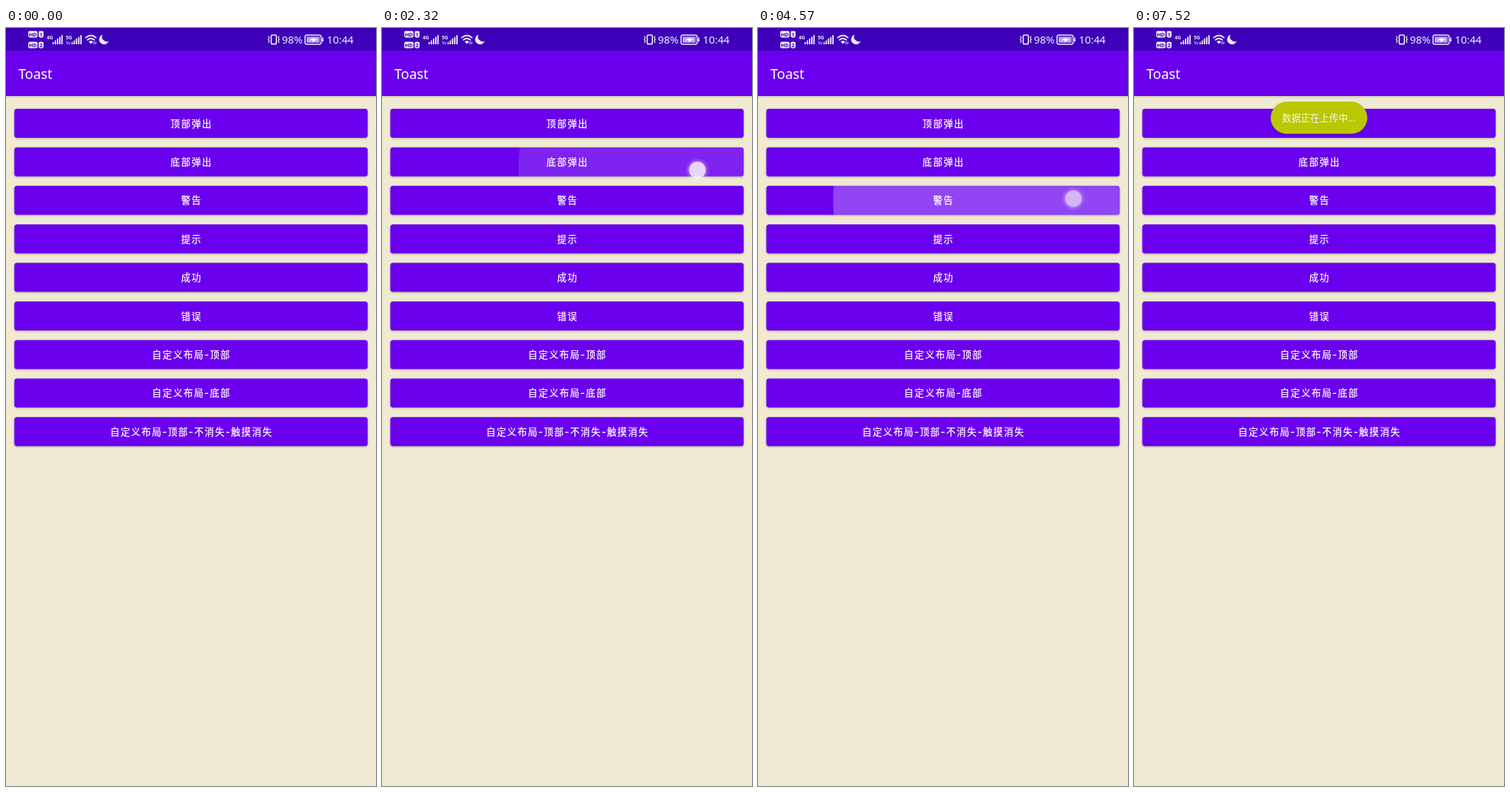
An HTML page that plays this animation: 523x1070 px, repeating every 8000 ms.

```html
<!DOCTYPE html>
<html lang="zh">
<head>
<meta charset="utf-8">
<title>Toast</title>
<style>
  html, body { margin: 0; width: 100%; height: 100%; overflow: hidden; background: #efead1; }
  svg { display: block; width: 100vw; height: 100vh; }
  .label, .note { font: 500 13.3px Inter, "Noto Sans CJK SC", sans-serif; fill: #fff; text-anchor: middle; }
  .label { letter-spacing: 1.5px; stroke: #fff; stroke-width: .25px; }
  .note { font-weight: 400; fill: #f6f8ee; }
  .title { font: 500 19.3px "Noto Sans", sans-serif; fill: #fff; }
  .clock { font: 400 14.8px "Noto Sans", sans-serif; }
  .tiny { font: 700 7px Roboto, sans-serif; }
  .badge { font: 700 8px Roboto, sans-serif; fill: #3e00b8; text-anchor: middle; }
</style>
</head>
<body>
<svg id="stage" viewBox="0 0 523 1070" preserveAspectRatio="none">
  <defs>
    <clipPath id="content"><rect y="96" width="523" height="974"/></clipPath>
    <linearGradient id="barShade" x2="0" y2="1">
      <stop stop-color="#000" stop-opacity=".12"/>
      <stop offset="1" stop-color="#000" stop-opacity="0"/>
    </linearGradient>
    <radialGradient id="halo">
      <stop offset=".66" stop-color="#fff" stop-opacity=".32"/>
      <stop offset="1" stop-color="#fff" stop-opacity="0"/>
    </radialGradient>
    <filter id="shadow" x="-10%" y="-20%" width="120%" height="150%">
      <feDropShadow dx="0" dy="1.2" stdDeviation="1" flood-color="#332" flood-opacity=".32"/>
    </filter>
  </defs>

  <rect width="523" height="1070" fill="#efead1"/>
  <rect y="96" width="523" height="4" fill="url(#barShade)"/>
  <g id="buttons"></g>
  <g id="toasts" clip-path="url(#content)"></g>
  <rect y="31" width="523" height="65" fill="#6a00ee"/>
  <rect width="523" height="32" fill="#3e00b8"/>
  <text class="title" x="17.5" y="72">Toast</text>

  <g id="status" fill="#f3effb">
    <text class="tiny" x="57.5" y="15.5" textLength="auto">4G</text>
    <text class="tiny" x="84.5" y="15.5">5G</text>
    <path d="M86.5 23v-4m-1.3 1.3 1.3-1.5M89 19v4m1.3-1.3-1.3 1.5" fill="none" stroke="#f3effb" stroke-width=".8"/>
    <g fill="none" stroke="#f3effb" stroke-width="1.8" stroke-linecap="round">
      <path d="M112.8 13.6Q120 7.4 127.2 13.6M115.2 16.8Q120 12.8 124.8 16.8"/>
    </g>
    <path d="M117 19.2q3-2.4 6 0l-3 3.6z"/>
    <path d="M124.3 23v-4m2.5 0v4" stroke="#f3effb" stroke-width="1"/>
    <path d="M136.5 9.4A7 7 0 1 0 145.3 18.4A6.6 6.6 0 0 1 136.5 9.4Z"/>
    <g fill="none" stroke="#f3effb" stroke-width="1.6">
      <rect x="374.8" y="10" width="7.4" height="12.6" rx="1.2"/>
      <path d="M370.8 11.5 372.2 13.5 370.8 16 372.2 18.5 370.8 21M386.2 11.5 384.8 13.5 386.2 16 384.8 18.5 386.2 21" stroke-width="1.3"/>
      <rect x="422.6" y="10" width="23" height="13" rx="3" stroke-width="1.5"/>
    </g>
    <rect x="424.8" y="12.2" width="18.6" height="8.6" rx="1.4" fill="#b9a3e4"/>
    <rect x="446.8" y="13.6" width="1.8" height="6" rx=".8"/>
    <path d="M428.5 17.2 436 13.2 435.4 15.8 441 15.6 433 20 433.8 17.3Z" fill="#fff"/>
    <text class="clock" x="390" y="22.3">98%</text>
    <text class="clock" x="453.5" y="22.3">10:44</text>
  </g>
  <g id="dot">
    <circle r="17" fill="url(#halo)"/>
    <circle r="11.8" fill="#fff" fill-opacity=".72"/>
  </g>
</svg>
<script>
const LOOP = 8000;
const $ = id => document.getElementById(id);
const clamp = v => Math.min(1, Math.max(0, v));

function make(tag, attrs, parent, text) {
  const el = document.createElementNS("http://www.w3.org/2000/svg", tag);
  for (const key in attrs) el.setAttribute(key, attrs[key]);
  if (text) el.textContent = text;
  parent.appendChild(el);
  return el;
}

// status bar: line badges and signal bars
["1", "2"].forEach((num, i) => {
  const y = 4.2 + i * 15.2;
  for (const [x, w, s] of [[31.5, 13, "HD"], [46.2, 6.8, num]]) {
    make("rect", { x, y, width: w, height: 9.2, rx: 1.8 }, $("status"));
    make("text", { class: "badge", x: x + w / 2, y: y + 7.5 }, $("status"), s);
  }
});
for (const x of [65.8, 92.6])
  for (let i = 0; i < 5; i++) {
    const h = 3 + i * 2.5;
    make("rect", { x: x + i * 3.1, y: 23 - h, width: 1.9, height: h, rx: .6 }, $("status"));
  }

const names = ["顶部弹出", "底部弹出", "警告", "提示", "成功", "错误",
  "自定义布局-顶部", "自定义布局-底部", "自定义布局-顶部-不消失-触摸消失"];
const buttonTop = i => 114 + i * 54.4;

const ripples = names.map((name, i) => {
  const box = { x: 11.7, y: buttonTop(i), width: 499.6, height: 41, rx: 4 };
  make("rect", { ...box, fill: "#6a00ee", filter: "url(#shadow)" }, $("buttons"));
  const clip = make("clipPath", { id: "clip" + i }, $("buttons"));
  make("rect", box, clip);
  const layer = make("g", { "clip-path": `url(#clip${i})` }, $("buttons"));
  const ripple = make("circle", { fill: "#fff", "fill-opacity": 0 }, layer);
  make("text", { class: "label", x: 262.2, y: box.y + 25.6 }, $("buttons"), name);
  return ripple;
});

// each press opens one toast; `from` is the hidden offset
const presses = [
  { at: 496, y: 138, leave: 1845, top: 104, from: -55, w: 113, rx: 10, fill: "#2a6800", text: "我是在顶部的" },
  { at: 2254, y: 200.5, leave: 4115, top: 1005, from: 66, w: 113.5, rx: 22.7, fill: "#2a6800", text: "我是在底部的" },
  { at: 4475, y: 241, leave: 6335, top: 104, from: -55, w: 113, rx: 22.7, fill: "#e69500", text: "请检查数据项" },
  { at: 6732, y: 297, leave: Infinity, top: 104, from: -55, w: 136.5, rx: 22.7, fill: "#b9c800", text: "数据正在上传中..." }
];
const touchX = 445.8, midX = 261.5;

for (const p of presses) {
  p.el = make("g", {}, $("toasts"));
  make("rect", { x: midX - p.w / 2, y: p.top, width: p.w, height: 45.3, rx: p.rx,
    fill: p.fill, filter: "url(#shadow)" }, p.el);
  make("text", { class: "note", x: midX, y: p.top + 28 }, p.el, p.text);
}

// fast-out, slow-in: cubic-bezier(.4, 0, .2, 1)
function fastOut(x) {
  let lo = 0, hi = 1;
  for (let i = 0; i < 20; i++) {
    const s = (lo + hi) / 2, r = 1 - s;
    if (1.2 * r * r * s + .6 * r * s * s + s * s * s < x) lo = s; else hi = s;
  }
  return 3 * (1 - lo) * lo * lo + lo ** 3;
}

function overshoot(x) {
  const u = x - 1;
  return u * u * (3 * u + 2) + 1;
}

function draw(t) {
  let dotAlpha = 0;
  presses.forEach((p, i) => {
    const age = t - p.at;
    const grow = fastOut(clamp(age / 225));
    const midY = buttonTop(i) + 20.5;
    const alpha = .27 * clamp((age - 50) / 33) * (1 - clamp((age - 225) / 165));
    const ripple = ripples[i];
    ripple.setAttribute("cx", touchX + (midX - touchX) * grow);
    ripple.setAttribute("cy", p.y + (midY - p.y) * grow);
    ripple.setAttribute("r", 150 + 101 * grow);
    ripple.setAttribute("fill-opacity", alpha);

    if (age >= 52 && age < 170) {
      dotAlpha = 1 - clamp((age - 70) / 100);
      $("dot").setAttribute("transform", `translate(${touchX} ${p.y})`);
    }

    const enter = clamp((age - 206) / 290);
    const exit = clamp((t - p.leave) / 225);
    const shift = p.from * (1 - overshoot(enter) + exit * exit);
    p.el.setAttribute("transform", `translate(0 ${shift})`);
    p.el.setAttribute("visibility", enter > 0 && exit < 1 ? "visible" : "hidden");
  });
  $("dot").setAttribute("opacity", dotAlpha);
}

const begin = performance.now();
function tick() {
  draw((performance.now() - begin) % LOOP);
  requestAnimationFrame(tick);
}
draw(0);
requestAnimationFrame(tick);
</script>
</body>
</html>
```
